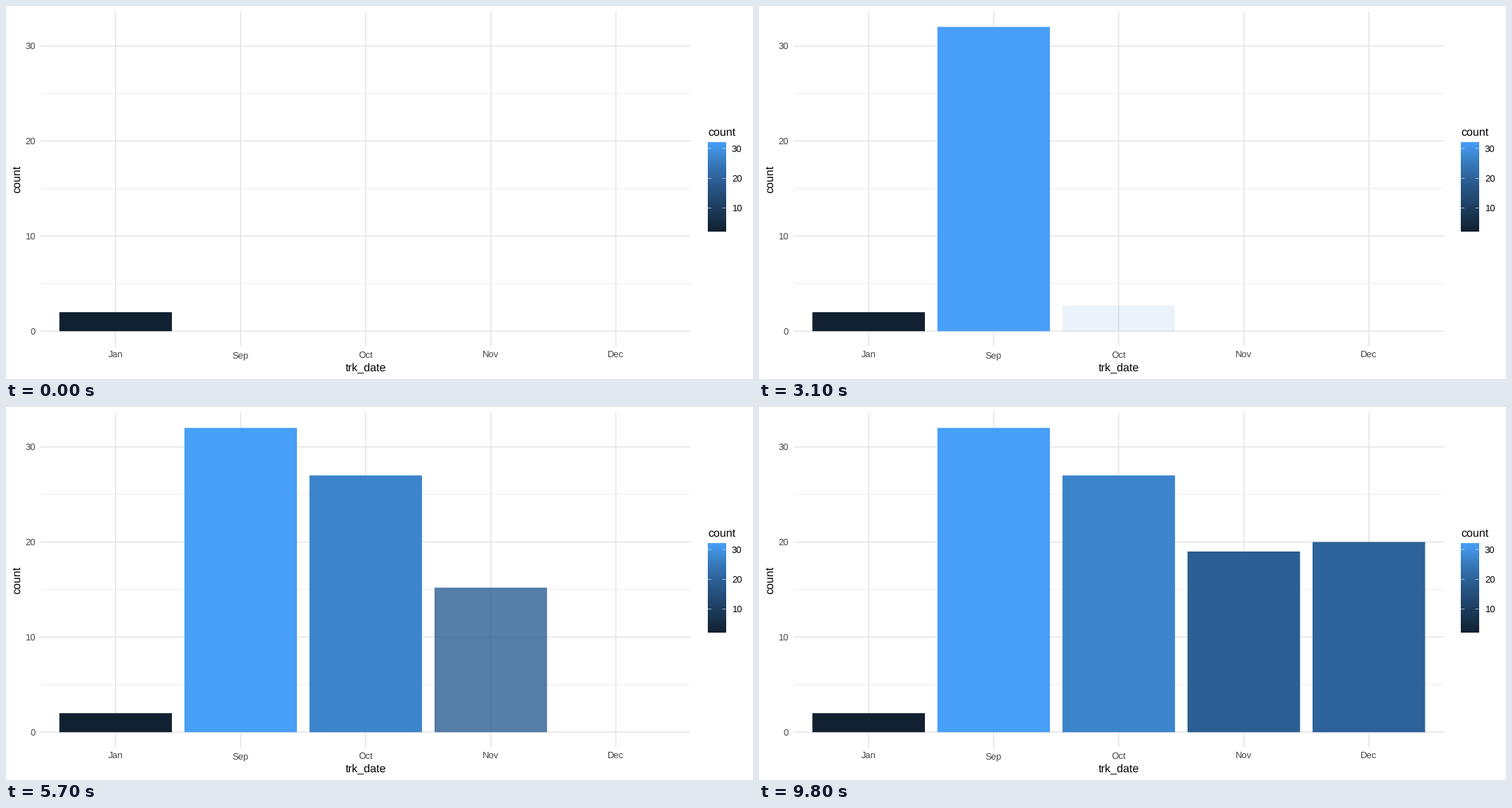
Animation, 1058 px wide and 529 px high, one loop 10 s. Source, as a matplotlib script:

```python
import matplotlib.pyplot as plt
import numpy as np
from matplotlib.animation import FuncAnimation
from matplotlib.patches import Rectangle

W, H, DPI = 1058, 529, 64
PT = 72 / DPI
STEP_MS, FRAMES = 100, 100

LEFT, RIGHT, TOP, BOTTOM = 49, 970, 8, 482.8
Y0, UNIT = 461.2, 13.487
SLOT = (RIGHT - LEFT) / 5.2
BAR_W = 0.9 * SLOT

MONTHS = ["Jan", "Sep", "Oct", "Nov", "Dec"]
COUNTS = [2, 32, 27, 19, 20]
ENTER_MS = [None, 1100, 3100, 5000, 7000]
GROW_STEPS = 10

GRID, TICK_TEXT = "#e5e5e5", "#444444"
STOPS = [2, 19, 20, 27, 32]
STOP_RGB = np.array([(17, 33, 49), (43, 94, 147), (45, 99, 154),
                     (60, 132, 203), (71, 159, 248)]) / 255

plt.rcParams["font.family"] = "Liberation Sans"
plt.rcParams["text.hinting"] = "none"
plt.rcParams["text.hinting_factor"] = 1

fig = plt.figure(figsize=(W / DPI, H / DPI), dpi=DPI, facecolor="white")
ax = fig.add_axes([0, 0, 1, 1])
ax.axis("off")


def shade(value):
    return np.stack([np.interp(value, STOPS, ch) for ch in STOP_RGB.T], axis=-1)


def y_of(value):
    return Y0 - value * UNIT


def x_of(i):
    return LEFT + (0.6 + i) * SLOT


def line(x, y, width, color=GRID, z=1):
    ax.plot(x, y, color=color, lw=width * PT, solid_capstyle="butt",
            snap=False, zorder=z)


def label(x, y, s, size=12.8, color="black", ha="center", **kw):
    ax.text(x, y, s, fontsize=size * PT, color=color, ha=ha, va="baseline", **kw)


# Grid and axes
for v in (5, 15, 25):
    line([LEFT, RIGHT], [y_of(v)] * 2, 0.78)
for v in (0, 10, 20, 30):
    line([LEFT, RIGHT], [y_of(v)] * 2, 1.55)
    label(41.5, y_of(v) + 4.7, str(v), color=TICK_TEXT, ha="right")
for i, month in enumerate(MONTHS):
    line([x_of(i)] * 2, [TOP, BOTTOM], 1.55)
    label(x_of(i), 499.3, month, color=TICK_TEXT)
label((LEFT + RIGHT) / 2, 518, "trk_date", size=16)
label(20, (TOP + BOTTOM) / 2, "count", size=16, rotation=90,
      rotation_mode="anchor")

# Colour legend
KEY_L, KEY_R, KEY_T, KEY_B = 994, 1019.6, 193.5, 320.5
label(KEY_L, 184, "count", size=16, ha="left")
ramp = shade(np.linspace(32, 2, 300))[:, None, :]
ax.imshow(ramp, extent=(KEY_L, KEY_R, KEY_B, KEY_T), aspect="auto",
          interpolation="nearest", zorder=2)
for v in (10, 20, 30):
    y = KEY_B - (v - 2) / 30 * (KEY_B - KEY_T)
    for x in (KEY_L, KEY_R - 5.1):
        line([x, x + 5.1], [y, y], 0.6, "white", 3)
    label(1028, y + 4.7, str(v), ha="left")

bars = []
for i, count in enumerate(COUNTS):
    bar = Rectangle((x_of(i) - BAR_W / 2, Y0), BAR_W, 0, lw=0,
                    facecolor=shade(count), snap=False, zorder=2)
    bars.append(ax.add_patch(bar))

ax.set_xlim(0, W)
ax.set_ylim(H, 0)


def growth(frame, start):
    if start is None:
        return 1.0
    return float(np.clip((frame - start // STEP_MS + 1) / GROW_STEPS, 0, 1))


def draw(frame):
    for bar, count, start in zip(bars, COUNTS, ENTER_MS):
        p = growth(frame, start)
        bar.set_height(-p * count * UNIT)
        bar.set_alpha(p)
    return bars


anim = FuncAnimation(fig, draw, frames=FRAMES, init_func=lambda: draw(0),
                     interval=STEP_MS, repeat=True, repeat_delay=0)
plt.show()
```
